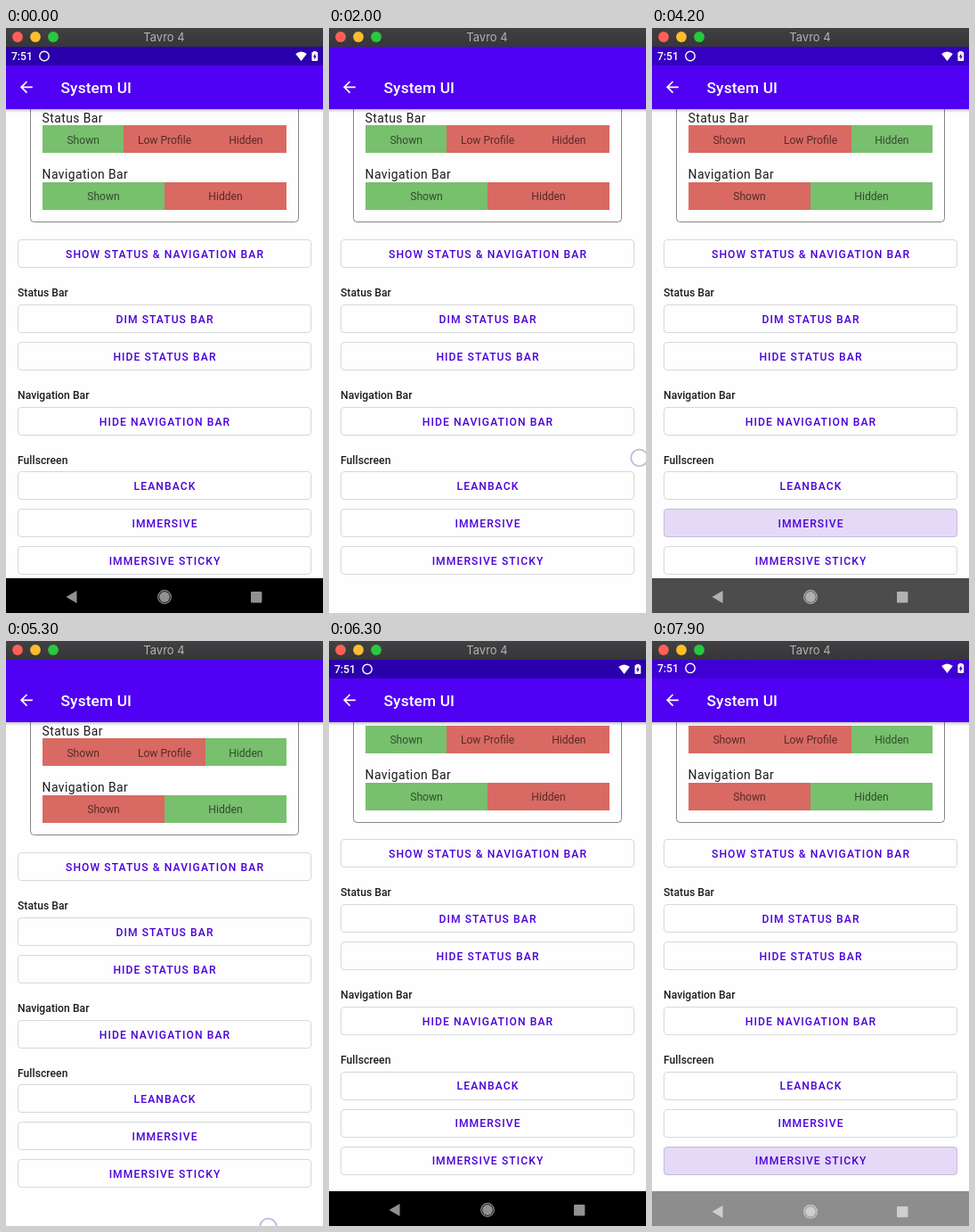
Recreate the animation shown at these times as an HTML page with a canvas. Size 356 by 656 pixels, loop 8 s.

```html
<!DOCTYPE html>
<html lang="en">
<head>
<meta charset="utf-8">
<title>System UI</title>
<style>
html, body { margin: 0; width: 100%; height: 100%; overflow: hidden; background: #fdfefd; }
canvas { display: block; width: 356px; height: 656px; }
</style>
</head>
<body>
<canvas id="stage"></canvas>
<script>
const W = 356, H = 656, LOOP = 8000;
const PURPLE = '#5000f2', INK = '#4c00d8', PAPER = '#fdfefd';
const canvas = document.getElementById('stage');
const dpr = window.devicePixelRatio || 1;
canvas.width = W * dpr;
canvas.height = H * dpr;
const ctx = canvas.getContext('2d');

// Taps on buttons, and the moments the bars hide or come back
const taps = [
  { at: 480, row: 4, x: 298, y: 514 },
  { at: 3850, row: 5, x: 298, y: 553 },
  { at: 7480, row: 6, x: 298, y: 588 }
];
const bars = [
  { at: 705, show: false },
  { at: 2050, show: true },
  { at: 4110, show: false },
  { at: 5500, show: true },
  { at: 7735, show: false }
];
const buttons = [
  [237, 'SHOW STATUS & NAVIGATION BAR'],
  [310, 'DIM STATUS BAR'],
  [352, 'HIDE STATUS BAR'],
  [425, 'HIDE NAVIGATION BAR'],
  [497.4, 'LEANBACK'],
  [539.4, 'IMMERSIVE'],
  [581.4, 'IMMERSIVE STICKY']
];
const labels = [[301, 'Status Bar'], [416, 'Navigation Bar'], [488.6, 'Fullscreen']];

const clamp = v => Math.max(0, Math.min(1, v));
const ramp = (t, from, length) => clamp((t - from) / length);
const easeOut = p => 1 - (1 - p) ** 3;

function rect(x, y, w, h, color) {
  ctx.fillStyle = color;
  ctx.fillRect(x, y, w, h);
}

function disc(x, y, r, color) {
  ctx.fillStyle = color;
  ctx.beginPath();
  ctx.arc(x, y, r, 0, 7);
  ctx.fill();
}

function ring(x, y, r, color, width) {
  ctx.strokeStyle = color;
  ctx.lineWidth = width;
  ctx.beginPath();
  ctx.arc(x, y, r, 0, 7);
  ctx.stroke();
}

function poly(points, color) {
  ctx.fillStyle = color;
  ctx.beginPath();
  points.forEach(([x, y]) => ctx.lineTo(x, y));
  ctx.closePath();
  ctx.fill();
}

function text(str, x, y, font, color, spacing = 0, align = 'left') {
  ctx.font = font + ' Roboto, sans-serif';
  ctx.letterSpacing = spacing + 'px';
  ctx.textAlign = align;
  ctx.fillStyle = color;
  ctx.fillText(str, x, y);
}

function barState(t) {
  const state = { shown: true, fade: 1, slide: 0 };
  for (const b of bars) {
    if (t >= b.at - 105) state.shown = b.show;
    if (t < b.at) continue;
    const p = ramp(t, b.at, 300);
    state.fade = b.show ? p : 1 - p;
    state.slide = b.show
      ? 1 - easeOut(ramp(t, b.at, 350))
      : ramp(t, b.at + 100, 350) ** 1.8;
  }
  return state;
}

function segments(y, names, active) {
  const w = 274 / names.length;
  names.forEach((name, i) => {
    const x = Math.round(41 + i * w), end = Math.round(41 + (i + 1) * w);
    rect(x, Math.round(y), end - x, 31, i === active ? '#78bf6e' : '#d96963');
    text(name, 41 + (i + 0.5) * w, y + 20.2, '12.12px', 'rgba(0,0,0,.6)', 0, 'center');
  });
}

function button(y, name, row, t) {
  const top = Math.round(y);
  ctx.beginPath();
  ctx.roundRect(13.5, top + 0.5, 329, 31, 3.5);
  ctx.strokeStyle = '#d8d8da';
  ctx.lineWidth = 1;
  ctx.stroke();
  const tap = taps.find(p => p.row === row);
  if (tap && t >= tap.at && t < tap.at + 900) {
    ctx.save();
    ctx.beginPath();
    ctx.roundRect(13, top, 330, 32, 4);
    ctx.clip();
    const alpha = 0.14 * (1 - ramp(t, tap.at + 480, 300));
    disc(tap.x, tap.y, 15 + 285 * ramp(t, tap.at, 260), `rgba(80,0,210,${alpha})`);
    ctx.restore();
  }
  text(name, 178.5, y + 20.6, '500 12.12px', INK, 1.08, 'center');
}

function content(t, shown) {
  const dy = -14.6 * easeOut(ramp(t, 5600, 250));
  ctx.beginPath();
  ctx.roundRect(27.5, 40.5, 301, Math.round(217.4 + dy) - 40, 4);
  ctx.strokeStyle = '#858585';
  ctx.lineWidth = 1;
  ctx.stroke();
  text('Status Bar', 40.6, 105.6 + dy, '13.86px', '#1c1c1c', 0.43);
  segments(109.4 + dy, ['Shown', 'Low Profile', 'Hidden'], shown ? 0 : 2);
  text('Navigation Bar', 40.6, 169.2 + dy, '13.86px', '#1c1c1c', 0.43);
  segments(173.2 + dy, ['Shown', 'Hidden'], shown ? 0 : 1);
  labels.forEach(([y, name]) => text(name, 13, y + dy, '500 12.12px', '#1c1c1c', 0.05));
  buttons.forEach(([y, name], row) => button(y + dy, name, row, t));
}

function toolbar() {
  const shadow = ctx.createLinearGradient(0, 91, 0, 95);
  shadow.addColorStop(0, 'rgba(0,0,0,.22)');
  shadow.addColorStop(1, 'rgba(0,0,0,0)');
  rect(0, 91, W, 4, shadow);
  rect(0, 21, W, 70, PURPLE);
  ctx.strokeStyle = '#fff';
  ctx.lineWidth = 1.7;
  ctx.beginPath();
  ctx.moveTo(29.8, 66.3);
  ctx.lineTo(17.2, 66.3);
  ctx.moveTo(23.5, 60);
  ctx.lineTo(17.2, 66.3);
  ctx.lineTo(23.5, 72.6);
  ctx.stroke();
  text('System UI', 61.5, 72.8, '500 17.32px', '#fff', 0.13);
}

function statusBar(fade, slide) {
  rect(0, 21, W, 21, `rgba(42,0,172,${fade})`);
  if (slide >= 1) return;
  ctx.save();
  ctx.beginPath();
  ctx.rect(0, 21, W, 21);
  ctx.clip();
  ctx.translate(0, -21 * slide);
  text('7:51', 6, 36, '500 12.1px', '#fff');
  ring(43, 31.5, 5.2, '#fff', 1.4);
  ctx.fillStyle = '#fff';
  ctx.beginPath();
  ctx.moveTo(331.5, 37);
  ctx.lineTo(325.2, 29);
  ctx.quadraticCurveTo(331.5, 24, 337.8, 29);
  ctx.fill();
  rect(345, 26, 3.6, 2, '#fff');
  ctx.beginPath();
  ctx.roundRect(343.4, 27, 6.8, 10, 1);
  ctx.fill();
  poly([[347.4, 28.4], [344.8, 32.6], [346.4, 32.6], [346.2, 35.6], [348.8, 31.4], [347.2, 31.4]], '#2a00ac');
  ctx.restore();
}

function navBar(fade, slide) {
  rect(0, 617, W, 39, `rgba(0,0,0,${fade})`);
  if (slide >= 1) return;
  ctx.save();
  ctx.translate(0, 39 * slide);
  const tint = 'rgba(255,255,255,.57)';
  poly([[67.5, 638], [79.5, 631], [79.5, 645]], tint);
  disc(178, 638, 5.9, tint);
  ring(178, 638, 7.3, tint, 1.2);
  ctx.fillStyle = tint;
  ctx.beginPath();
  ctx.roundRect(275, 632, 12.4, 12.4, 1);
  ctx.fill();
  ctx.restore();
}

function titleBar() {
  const shade = ctx.createLinearGradient(0, 0, 0, 21);
  shade.addColorStop(0, '#414143');
  shade.addColorStop(1, '#363638');
  rect(0, 0, W, 21, shade);
  ['#fe5f57', '#febc2e', '#28c840'].forEach((c, i) => disc(13 + 20 * i, 10, 5.9, c));
  ctx.font = '13px Inter, sans-serif';
  ctx.letterSpacing = '0px';
  ctx.textAlign = 'center';
  ctx.fillStyle = '#b2b2b4';
  ctx.fillText('Tavro 4', 177.5, 15);
}

function pointer(t) {
  const mark = (x, y) => ring(x, y, 9.3, 'rgba(150,135,205,.6)', 1.8);
  taps.forEach(p => { if (t >= p.at - 80 && t < p.at + 140) mark(p.x, p.y); });
  if (t >= 1900 && t < 2140) mark(348.5, 482);
  if (t >= 5200 && t < 5800) mark(294.5, 657 - 75 * ramp(t, 5300, 500));
}

function draw(t) {
  const { shown, fade, slide } = barState(t);
  ctx.setTransform(dpr, 0, 0, dpr, 0, 0);
  rect(0, 0, W, H, PAPER);
  content(t, shown);
  toolbar();
  statusBar(fade, slide);
  navBar(fade, slide);
  pointer(t);
  titleBar();
}

const start = performance.now();
function tick() {
  draw((performance.now() - start) % LOOP);
  requestAnimationFrame(tick);
}
tick();
</script>
</body>
</html>
```
